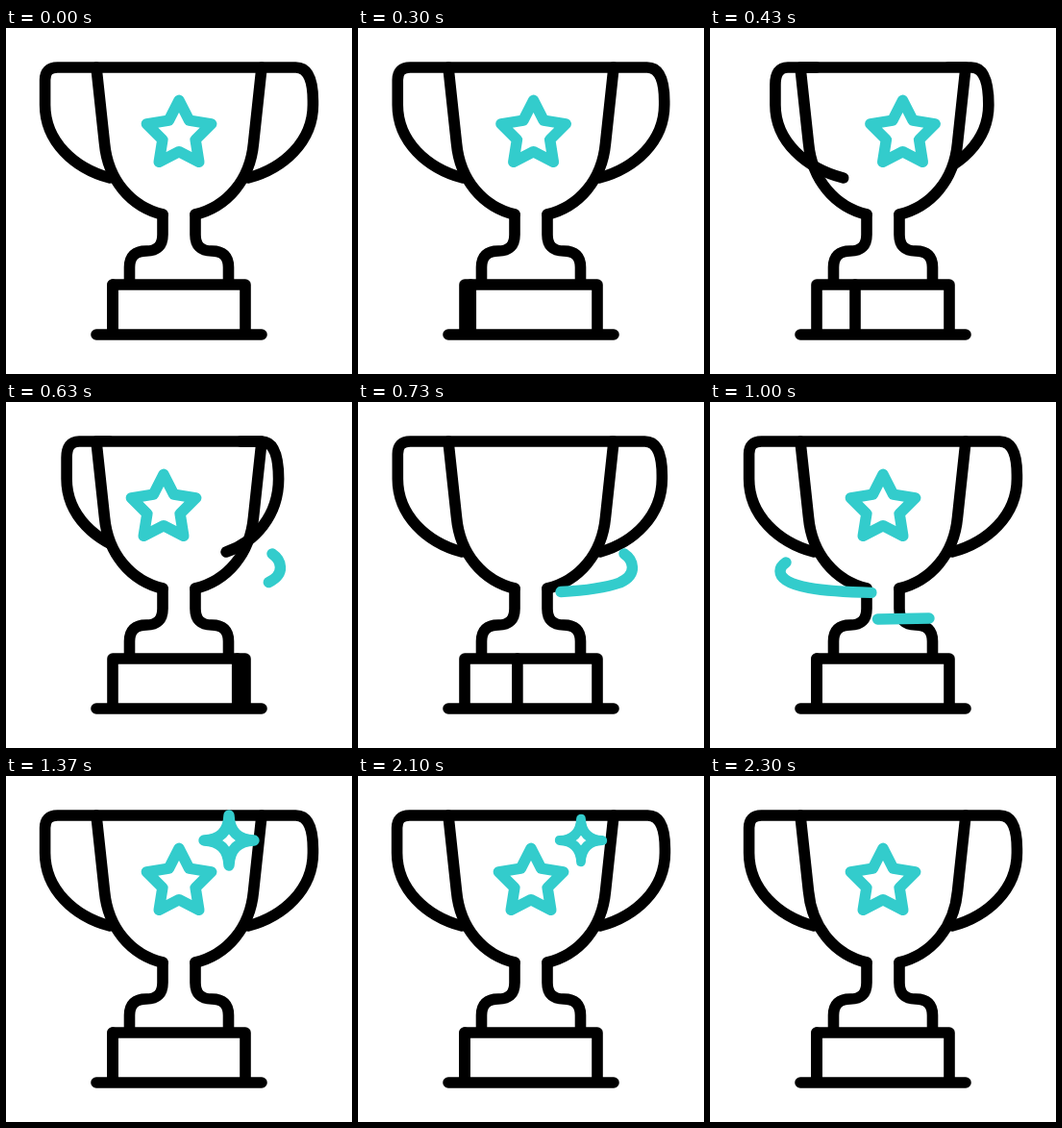
These frames come from a looping animation (360 by 360 pixels, 2.5 s). An HTML page:

```html
<!DOCTYPE html>
<html lang="en">
<head>
<meta charset="utf-8">
<title>Spinning trophy</title>
<style>
html, body { margin: 0; width: 100%; height: 100%; overflow: hidden; background: #fff; }
svg { display: block; width: 100%; height: 100%; fill: none; stroke: #000; stroke-width: 11.6; stroke-linecap: round; stroke-linejoin: round; }
.cyan { stroke: #33cccc; stroke-width: 11.4; }
</style>
</head>
<body>
<svg viewBox="0 0 360 360">
  <defs>
    <path id="cup" d="M163 194C130 186 106 158 102.500 120L94 41H266L257.500 120C254 158 230 186 197 194"/>
    <clipPath id="inside"><use href="#cup"/></clipPath>
  </defs>
  <path id="back"/>
  <use href="#cup" fill="#fff" stroke="none"/>
  <g clip-path="url(#inside)"><path id="star" class="cyan"/></g>
  <use href="#cup"/>
  <path d="M163 194V215Q163 232 146 232Q128.500 232 128.500 249V266M197 194V215Q197 232 214 232Q231.500 232 231.500 249V266"/>
  <path d="M111 318V267H249V318M94 319H266"/>
  <path id="edge" d="M111 267V318"/>
  <path id="front"/>
  <path id="upper" class="cyan" pathLength="100" d="M277 158C286 164 292 179 272.500 188C250 196 215 198 180 198.500C130 198 73 195 73 176Q73 171 79 167"/>
  <path id="lower" class="cyan" pathLength="100" d="M228 225L174 226C150 226 130 224 128 216"/>
  <path id="spark" class="cyan" d="M0-26Q1-1 26 0Q1 1 0 26Q-1 1-26 0Q-1-1 0-26Z"/>
</svg>
<script>
const $ = id => document.getElementById(id);
const clamp = (v, lo, hi) => Math.min(hi, Math.max(lo, v));
const FPS = 30, LOOP = 2500;

// Monotone cubic through [time, value] keys, at rest at both ends.
function track(...keys) {
  const slope = k => keys[k] && keys[k + 1]
    ? (keys[k + 1][1] - keys[k][1]) / (keys[k + 1][0] - keys[k][0]) : 0;
  const tangent = k => {
    const a = slope(k - 1), b = slope(k);
    return a * b > 0 ? 2 * a * b / (a + b) : 0;
  };
  return t => {
    if (t <= keys[0][0]) return keys[0][1];
    const k = keys.findIndex(key => key[0] >= t) - 1;
    if (k < 0) return keys[keys.length - 1][1];
    const [t0, v0] = keys[k], [t1, v1] = keys[k + 1];
    const h = t1 - t0, u = (t - t0) / h, w = 1 - u;
    return v0 * w * w * (1 + 2 * u) + v1 * u * u * (3 - 2 * u)
      + h * u * w * (tangent(k) * w - tangent(k + 1) * u);
  };
}

const spin = (a, b, c) => track([7, 0], [13, a], [19, b], [26, c], [30, 360]);
const footTurn = spin(55, 133, 256);
const frontTurn = spin(36.5, 138, 255.6);
const backTurn = spin(38, 147, 256);
const starShift = track([7, 0], [13, 20.5], [19, 224], [26, 550], [30, 720]);
const baseTurn = track([7, 0], [13, .29], [19, .94], [26, 2.13], [30, 3]);
const upperHead = track([17, 0], [19, 14.7], [26, 72], [30, 100]);
const upperTail = track([24, 0], [26, 10], [30, 56], [34, 100]);
const lowerHead = track([25, 0], [26, 7], [30, 52], [34, 100]);
const lowerTail = track([30, 0], [37, 100]);

// Handle seen at signed widths: outer bow and lower foot, -1 left to 1 right.
// The right side has a softer shoulder than the left.
function handle(outer, foot) {
  const root = 180 + 86 * outer, bow = 180 + 139.4 * outer, end = 180 + 72 * foot;
  const [round, fall] = outer > 0 ? [18, 76] : [13, 54];
  const corner = bow - Math.sign(outer) * Math.min(round, 53 * Math.abs(outer));
  const drop = Math.min(80, fall + 25 * (1 - Math.abs(outer)));
  return `M${root} 41H${corner}Q${bow} 41 ${bow} ${drop}V80` +
    `C${bow} 118 ${bow + .45 * (end - bow)} 146 ${end} 156`;
}

function ribbon(id, head, tail) {
  const el = $(id), size = head - tail;
  el.style.display = size > .1 ? "" : "none";
  el.setAttribute("stroke-dasharray", `${Math.max(size, .1)} 999`);
  el.setAttribute("stroke-dashoffset", -tail);
}

const points = Array.from({ length: 10 }, (_, k) => {
  const r = k % 2 ? 18 : 35.4, a = k * Math.PI / 5;
  return `${180 + r * Math.sin(a)} ${110.7 - r * Math.cos(a)}`;
});
$("star").setAttribute("d", `M${points.join("L")}Z`);

function draw(t) {
  const foot = footTurn(t), half = 180 * Math.floor(foot / 180);
  const width = angle => Math.cos(clamp(angle - half, 0, 180) * Math.PI / 180);
  $("front").setAttribute("d", handle(-width(frontTurn(t)), -width(foot)));
  $("back").setAttribute("d", handle(width(backTurn(t)), width(foot)));

  const shift = (starShift(t) + 120) % 240 - 120;
  $("star").setAttribute("transform", `translate(${shift})`);
  $("edge").setAttribute("transform", `translate(${138 * (baseTurn(t) % 1)})`);

  ribbon("upper", upperHead(t), upperTail(t));
  ribbon("lower", lowerHead(t), lowerTail(t));

  const size = clamp(Math.min((t - 34) / 7, (69 - t) / 7), 0, 1);
  $("spark").style.display = size ? "" : "none";
  $("spark").setAttribute("transform", `translate(232 67) scale(${size})`);
}

const start = performance.now();
function tick() {
  const ms = (performance.now() - start) % LOOP;
  draw(Math.floor((ms + 3.5) * FPS / 1000) % (LOOP * FPS / 1000));
  requestAnimationFrame(tick);
}
tick();
</script>
</body>
</html>
```
